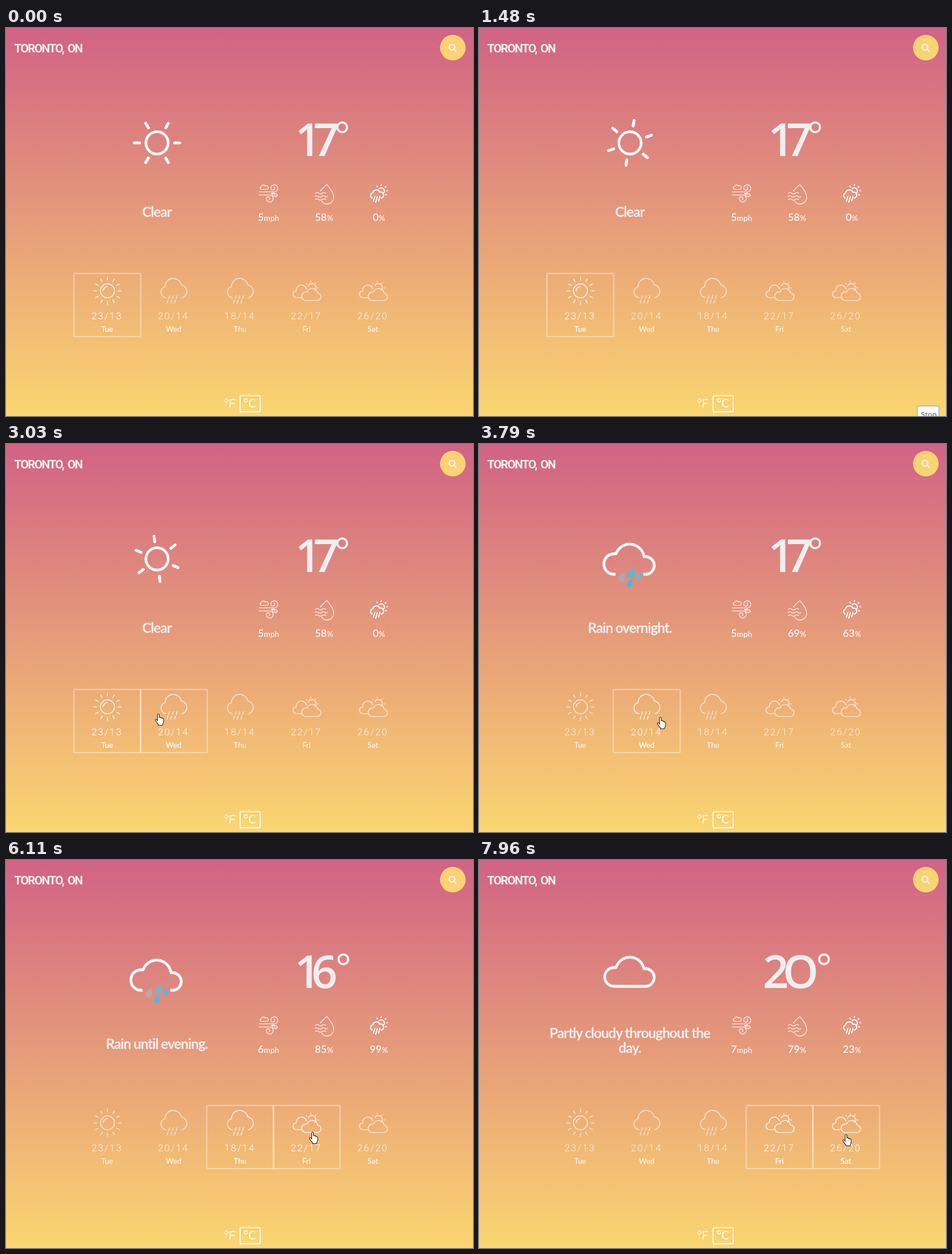
An HTML page that plays this animation: 821x682 px, repeating every 8000 ms.

```html
<!DOCTYPE html>
<html lang="en">
<head>
<meta charset="utf-8">
<title>Weather</title>
<style>
html, body { margin: 0; width: 100%; height: 100%; overflow: hidden; background: #e69c7a; }
svg { display: block; width: 100%; height: 100%; }
text { font-family: Lato, sans-serif; fill: #fff; }
.line { fill: none; stroke: #fff; stroke-linecap: round; stroke-linejoin: round; }
.mid { text-anchor: middle; }
.city { font-family: Roboto, sans-serif; font-size: 20.8px; font-weight: 700; letter-spacing: -1.6px; word-spacing: 3px; fill: #efefef; }
.summary { font-size: 24.5px; font-weight: 700; letter-spacing: -1.1px; fill: #efefef; }
.temp { font-family: "Open Sans", sans-serif; font-size: 80px; font-weight: 600; fill: #efefef; }
.ring { font-size: 68px; font-weight: 400; }
.stat { font-size: 18px; font-weight: 500; }
.unit { font-size: 13.8px; }
.range { font-family: Roboto, sans-serif; font-size: 17.2px; font-weight: 300; letter-spacing: 1.9px; }
.day { font-size: 13.2px; font-weight: 600; }
.scale { font-size: 20.5px; }
</style>
</head>
<body>
<svg viewBox="0 0 821 682" preserveAspectRatio="none">
  <defs>
    <linearGradient id="sky" x2="0" y2="1">
      <stop offset="0" stop-color="#d16285"/>
      <stop offset="1" stop-color="#fbd670"/>
    </linearGradient>
    <g id="sunny" class="line" stroke-width="1.7"></g>
    <g id="rainy" class="line" stroke-width="1.7">
      <path d="M-14 474A9.8 9.8 0 0 1-15.5 454.8A14.4 14.4 0 0 1 13 451.6A11.4 11.4 0 0 1 14 474"/>
      <path d="M-7.5 470.5l-1.5 5M-1 470.5l-1.5 5M5.5 470.5l-1.5 5M-10.5 478.5l-1.5 5M-4 478.5l-1.5 5M2.5 478.5l-1.5 5"/>
    </g>
    <g id="cloudy" class="line" stroke-width="1.7">
      <path d="M-3 479H18a6.5 6.5 0 0 0 1-13a9.6 9.6 0 0 0-18.5-2a7.6 7.6 0 0 0-3.5 15z"/>
      <path d="M-10 474H-18a6 6 0 0 1-.5-12a9.2 9.2 0 0 1 18-3.5"/>
      <path d="M2.5 453.5A7 7 0 1 1 14 461M7 445v1.6M15 449l1-1M18.5 457h1.8M-1 449l1 1"/>
    </g>
    <path id="drop" d="M3.5-9C6-3 6.5 1 5 5A5.6 5.6 0 0 1-6 4C-6.5-1-1-4 3.5-9z"/>
  </defs>

  <rect width="821" height="682" fill="url(#sky)"/>
  <text class="city" x="14.5" y="42.5">TORONTO, ON</text>
  <circle cx="785.5" cy="34.5" r="22.5" fill="#fad373"/>
  <path class="line" style="stroke:#efefef" stroke-width="2.5" d="M779 33.7a5 5 0 1 0 10 0a5 5 0 1 0-10 0M788 37.6l3.2 3.2"/>

  <g id="sun" class="line" stroke-width="5"><circle r="19.6" stroke-width="4.6"/></g>
  <g id="rain">
    <path class="line" style="stroke-linecap:butt" stroke-width="4.8" d="M240 229H237.5A18 18 0 0 1 237.5 193H241A25.3 25.3 0 0 1 290 198H292.5A15.5 15.5 0 0 1 292.5 229H289"/>
    <g id="drops"></g>
  </g>
  <g id="cloud">
    <g id="peek" class="line" stroke-width="3.2"><circle r="12"/></g>
    <path class="line" stroke-width="4.8" d="M237.5 222A16.5 16.5 0 0 1 237.5 189H241A25.3 25.3 0 0 1 290 191H292.5A15.5 15.5 0 0 1 292.5 222Z"/>
  </g>

  <g id="summary"></g>
  <g id="temp"></g>

  <g class="line" stroke-width="1.1">
    <path d="M445 288H471.5A6.2 6.2 0 1 0 465.5 281.5A3.4 3.4 0 1 0 471 279"/>
    <path d="M449.5 283.5a2.5 2.5 0 0 1 0-5a3.3 3.3 0 0 1 6.3-.5a2.8 2.8 0 0 1 4 5.5z"/>
    <path d="M445 293.5H463A6.2 6.2 0 1 1 457.5 300A3.2 3.2 0 1 1 462.5 302.5"/>
    <path d="M467 290.5c1 6 5 7.5 10.5 4c-2-4-6-5-10.5-4zl6 3"/>
    <path d="M552.5 287C555 283 560 279 564 275C568 280 575.8 288 575.8 296A11.5 11.5 0 0 1 555 304.5"/>
    <path d="M544 290.5q3-2.5 6 0t6 0t6 0M543 296q3-2.5 6 0t6 0t6 0t5 0M544 301.5q3-2.5 6 0t6 0t6 0"/>
  </g>
  <g class="line" stroke-width="2">
    <path d="M643.5 299A5 5 0 0 1 644.5 290A6.6 6.6 0 0 1 657 288.5A5.4 5.4 0 0 1 660 299"/>
    <path d="M648.5 296l-2.5 8.5M653 296l-3 10M657.5 296l-2.5 8"/>
    <path d="M656 282.5a5.5 5.5 0 0 1 8 7.5M660 275v1.5M668 278.5l-1.5 1.5M670.5 286h-1M668.5 293.5l-1-1M652 278l1 1"/>
  </g>
  <g id="stats"></g>
  <g id="cards"></g>

  <text class="scale mid" x="393" y="667">°F</text>
  <text class="scale mid" x="428.5" y="667">°C</text>
  <rect x="411.5" y="646" width="35.5" height="28.5" rx="2" fill="none" stroke="#fff" stroke-width="1.8"/>

  <g id="tip">
    <rect x="770.5" y="664.5" width="38" height="30" fill="#fff" stroke="#9c9c9c"/>
    <text x="777" y="683.5" style="font:13px 'Noto Sans',sans-serif;fill:#555">Stop</text>
  </g>
  <circle id="press" r="13" fill="#f1d62f" opacity=".9"/>
  <g id="cursor" fill="#fff" stroke="#222" stroke-width="1.1" stroke-linejoin="round">
    <path id="hand" d="M-1.5 1.5Q0-1 1.5 1.5V6.5Q3.5 5.5 4.3 7.5Q6 6.5 6.8 8.5Q9 8 9 10V14Q8.500 17 7 19V20.5H0V19Q-3 16-5.5 11.5Q-5.5 9-3.5 10L-1.5 12.5z"/>
    <path id="arrow" d="M0 0V16L4 12.5L6.5 18L9 17L6.5 11.5H11.5z"/>
  </g>
</svg>
<script>
const LOOP = 8000;
const $ = id => document.getElementById(id);
const clamp = v => Math.max(0, Math.min(1, v));
const show = (id, on) => $(id).setAttribute('display', on ? 'inline' : 'none');

function rays(count, from, to) {
  let d = '';
  for (let i = 0; i < count; i++) {
    const a = i * 2 * Math.PI / count, c = Math.cos(a), s = Math.sin(a);
    d += `M${c * from} ${s * from}L${c * to} ${s * to}`;
  }
  return `<path d="${d}"/>`;
}

$('sun').innerHTML += rays(6, 30.5, 40);
$('peek').innerHTML += rays(8, 17, 21);
$('sunny').innerHTML = `<g transform="translate(0 462)"><circle r="12.3"/>
  <path d="M-7.5 0A7.5 7.5 0 0 1 0-7.5"/>${rays(12, 19, 24)}</g>`;

// Raindrops: x, y, phase of the blue pulse
const drops = [[251.5, 233, 0.4], [268, 226, -0.45], [280.5, 232, 0], [265, 244, -0.38]];
$('drops').innerHTML = drops.map(([x, y], i) => {
  const at = `href="#drop" transform="translate(${x} ${y}) scale(${i < 2 ? 1 : 0.8})"`;
  return `<use ${at} fill="#d2aca6" opacity=".65"/><use ${at} class="blue" fill="#1cc3f3"/>`;
}).join('');
const blues = document.querySelectorAll('.blue');

// Forecast cards with the time each highlight starts and ends
const days = [
  ['Tue', '23/13', 'sunny', -1000, 3090],
  ['Wed', '20/14', 'rainy', 2010, 4730],
  ['Thu', '18/14', 'rainy', 4110, 6340],
  ['Fri', '22/17', 'cloudy', 5480, 9000],
  ['Sat', '26/20', 'cloudy', 7450, 9000]
];
$('cards').innerHTML = days.map(([day, range, icon], i) =>
  `<g transform="translate(${178.4 + 116.8 * i} 0)">
    <g class="frame" fill="none" stroke="#fff">
      <rect x="-59" y="431.5" width="117.5" height="111" rx="1.5" stroke-width="3" opacity=".2"/>
      <rect x="-59" y="431.5" width="117.5" height="111" rx="1.5" stroke-width="1.2" opacity=".3"/>
    </g>
    <g class="info">
      <use href="#${icon}" opacity=".78"/>
      <text class="range mid" x="-1" y="511.5">${range}</text>
      <text class="day mid" x="-.5" y="534">${day}</text>
    </g>
  </g>`).join('');
const frames = document.querySelectorAll('.frame');
const infos = document.querySelectorAll('.info');

// The large display face has a wide round zero, so the letter O stands in for it.
const views = [
  { from: 0, icon: 'sun', text: ['Clear'], temp: [['1', 508], ['7', 540]], ring: 576.5, stats: ['5', '58', '0'] },
  { from: 3090, icon: 'rain', text: ['Rain overnight.'], temp: [['1', 508], ['7', 540]], ring: 576.5, stats: ['5', '69', '63'] },
  { from: 4730, icon: 'rain', text: ['Rain until evening.'], temp: [['1', 507], ['6', 537]], ring: 578.5, stats: ['6', '85', '99'] },
  { from: 6340, icon: 'cloud', text: ['Partly cloudy throughout the', 'day.'], temp: [['2', 499], ['O', 534]], ring: 592, stats: ['7', '79', '23'] }
];
const units = ['mph', '%', '%'];
let current = null;

function setView(view) {
  if (view === current) return;
  current = view;
  ['sun', 'rain', 'cloud'].forEach(id => show(id, id === view.icon));
  const top = view.text.length > 1 ? 313 : 332;
  $('summary').innerHTML = view.text.map((s, i) =>
    `<text class="summary mid" x="265" y="${top + 26 * i}">${s}</text>`).join('');
  $('temp').innerHTML = view.temp.map(([s, x]) => `<text class="temp" x="${x}" y="224.5">${s}</text>`).join('') +
    `<text class="temp ring" x="${view.ring}" y="214">°</text>`;
  $('stats').innerHTML = view.stats.map((s, i) =>
    `<text class="stat mid" x="${[461.5, 559, 655.5][i]}" y="339">${s}<tspan class="unit">${units[i]}</tspan></text>`).join('');
}

// Pointer path: time, x, y
const path = [
  [1500, 660, 705], [1570, 573, 677], [1610, 517, 668], [1650, 436, 646], [1750, 370, 622],
  [1850, 326, 582], [1950, 290, 530], [2050, 263, 486], [2300, 266, 477], [3030, 268, 474],
  [3450, 268, 475], [3750, 310, 480], [4000, 365, 480], [4140, 408, 476], [4300, 413, 475],
  [5050, 414, 476], [5300, 440, 480], [5500, 478, 482], [5780, 537, 479], [6110, 539, 478],
  [6900, 540, 479], [7430, 594, 483], [7700, 640, 482], [8000, 646, 482]
];
const presses = [3070, 4600, 6240];

function pointer(t) {
  const i = Math.max(1, path.findIndex(p => p[0] >= t));
  const [t0, x0, y0] = path[i - 1], [t1, x1, y1] = path[i];
  const k = clamp((t - t0) / (t1 - t0));
  return [x0 + (x1 - x0) * k, y0 + (y1 - y0) * k];
}

function render(t) {
  setView(views.filter(v => v.from <= t).pop());
  $('sun').setAttribute('transform', `translate(265.5 202) rotate(${t * 0.0272})`);

  blues.forEach((el, i) => {
    const phase = (t - 4670) / 1200 + drops[i][2];
    el.setAttribute('opacity', 0.5 + 0.5 * Math.cos(2 * Math.PI * phase));
  });

  const p = clamp((t - 6340) / 1600);
  $('peek').setAttribute('transform', `translate(${292 + 12 * p} ${183 + 3 * p}) rotate(${t * 0.03})`);
  $('peek').setAttribute('opacity', 0.7 * Math.sin(Math.PI * p) ** 2);

  days.forEach((d, i) => {
    const level = clamp((t - d[3]) / 350) * (1 - clamp((t - d[4]) / 220));
    frames[i].setAttribute('opacity', level);
    infos[i].setAttribute('opacity', 0.8 + 0.2 * level);
  });

  show('tip', t >= 500 && t < 1540);
  const [x, y] = pointer(t), at = `translate(${x} ${y})`;
  show('cursor', t >= 1500);
  $('cursor').setAttribute('transform', at);
  show('hand', y < 542);
  show('arrow', y >= 542);
  show('press', presses.some(s => t >= s && t < s + 150));
  $('press').setAttribute('transform', at);
}

const start = performance.now();
function tick() {
  render((performance.now() - start) % LOOP);
  requestAnimationFrame(tick);
}
tick();
</script>
</body>
</html>
```
